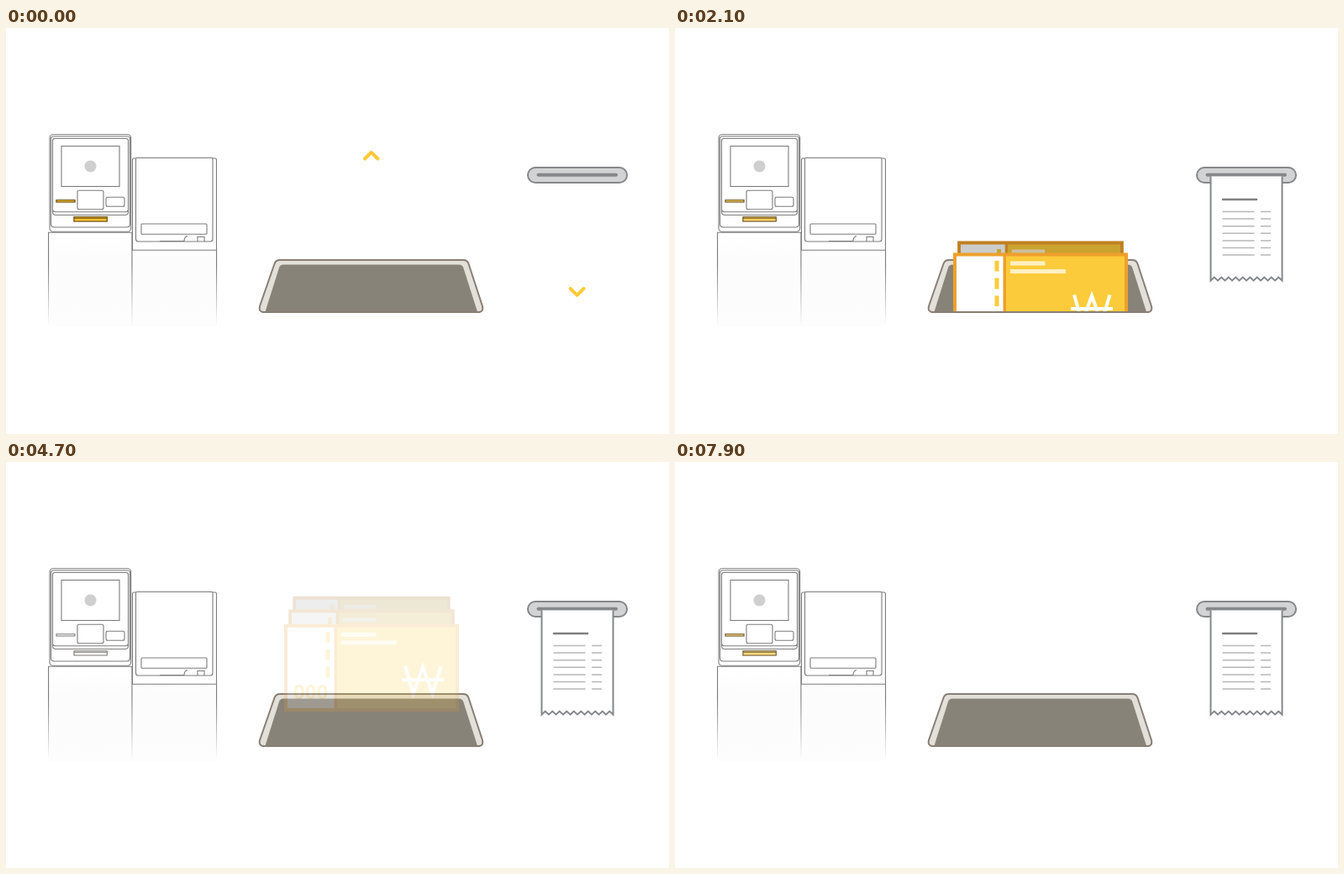
Recreate the animation shown at these times as an HTML page. Size 789 by 483 pixels, loop 8 s.

```html
<!DOCTYPE html>
<html lang="en">
<head>
<meta charset="utf-8">
<title>Kiosk cash and receipt</title>
<style>
  html, body { margin: 0; width: 100%; height: 100%; overflow: hidden; background: #fff; }
  svg { display: block; width: 789px; height: 483px; }
  .thin { fill: none; stroke: #7c7c7c; stroke-width: 1.1; }
  .grey { stroke: #85878a; stroke-width: 2; }
  .chevron { fill: none; stroke: #ffc938; stroke-width: 4; stroke-linecap: round; stroke-linejoin: round; }
  .zeros { font: 700 24px "Open Sans", sans-serif; fill: #fccb3b; }
</style>
</head>
<body>
<svg viewBox="0 0 789 483">
  <defs>
    <linearGradient id="fadeLine" gradientUnits="userSpaceOnUse" x1="0" y1="243" x2="0" y2="354">
      <stop offset=".35" stop-color="#7c7c7c"/><stop offset="1" stop-color="#7c7c7c" stop-opacity="0"/>
    </linearGradient>
    <linearGradient id="fadeFill" gradientUnits="userSpaceOnUse" x1="0" y1="243" x2="0" y2="356">
      <stop offset="0" stop-color="#fff"/><stop offset=".3" stop-color="#fcfcfc"/><stop offset="1" stop-color="#fdfdfd"/>
    </linearGradient>
    <clipPath id="trayClip"><path d="M0 0H789V337H0z"/></clipPath>
    <clipPath id="slotClip"><path d="M600 176.5H789V483H600z"/></clipPath>
    <g id="bill">
      <rect x="331" width="208" height="104" fill="#eea02b"/>
      <rect x="335" y="4" width="55.5" height="96" fill="#fff"/>
      <rect x="394" y="4" width="141" height="96" fill="#fccb3b"/>
      <path d="M383 9.500v12.500M383 30v13M383 51v12.500" stroke="#fccb3b" stroke-width="5"/>
      <path d="M399 12.500h41.500M399 22h66" stroke="#fff0c4" stroke-width="5"/>
      <path d="M475 50L484.500 83L496 51L507.500 83L517.500 50M471 66.500h50" fill="none" stroke="#fff" stroke-width="4"/>
      <text class="zeros" x="342" y="89">000</text>
    </g>
  </defs>

  <g class="thin">
    <path d="M50.500 243H150V356H50.500zM150 264H250.500V356H150z" fill="url(#fadeFill)" stroke="none"/>
    <g fill="url(#fadeLine)" stroke="none">
      <rect x="50" y="243" width="1.100" height="111"/>
      <rect x="149.400" y="243" width="1.100" height="111"/>
      <rect x="250" y="264" width="1.100" height="90"/>
    </g>
    <path d="M50 243.300H150M150 264.300H251M150.500 264V157q0-2 2-2H248.500q2 0 2 2V264"/>
    <path d="M154.500 156q0-1.500 1.500-1.500H244.500q1.500 0 1.500 1.500V251q0 3-3 3H157.500q-3 0-3-3z" fill="#fff"/>
    <rect x="161" y="233" width="78" height="12.300" rx="1"/>
    <path d="M183 253.500h29q0-5 4-6M228 254v-5.500h8v5.500"/>
    <rect x="52" y="126.700" width="96.700" height="115.500" rx="4"/>
    <path d="M53.500 131q0-2 3-2H144.500q3 0 3 2V233q0 4-4 4H57.500q-4 0-4-4z"/>
    <path d="M55.500 134q0-2.500 2.500-2.500H143q2.500 0 2.500 2.500V219q0 3.500-4 3.500H59.500q-4 0-4-3.500zM55.500 216q0 2.700 3 2.700H142.500q3 0 3-2.700"/>
    <rect x="66" y="140.500" width="69" height="48"/>
    <rect x="85" y="193.200" width="31" height="22.500" rx="2"/>
    <rect x="119" y="201.200" width="22" height="11" rx="2"/>
    <path id="slots" d="M60 204.700h22v2.300h-22zM81 224.800h39.300v5.200h-39.300zM81 226.300h39.300"/>
    <path id="glow" d="M60 204.700h22v2.300h-22zM81 224.800h39.300v5.200h-39.300zM81 226.300h39.300" fill="#ffc22e" stroke="#6e5212"/>
  </g>
  <circle cx="100.500" cy="164.500" r="7" fill="#cfcfcf"/>

  <path id="tray" d="M326 276H544q5 0 6.500 4.500L567 331q1.500 7-5 7H307q-6.500 0-5-7L319.500 280.500q1.500-4.500 6.500-4.500z" fill="#e3e0da" stroke="#887f74" stroke-width="2"/>
  <path d="M330 281.500H539q4 0 5.300 3.700L561 337.500H308.500L325 285.200q1.200-3.700 5-3.700z" fill="#888378"/>
  <g clip-path="url(#trayClip)"><g id="bills"></g></g>
  <path d="M305 338H564" stroke="#887f74" stroke-width="2"/>

  <rect class="grey" x="621" y="166" width="118" height="18" rx="9" fill="#d1d3d4"/>
  <path d="M633.500 174.700H726" class="grey" style="stroke-width:4" stroke-linecap="round"/>
  <g clip-path="url(#slotClip)"><g id="receipt"></g></g>
  <g id="arrows"></g>
</svg>
<script>
const LOOP = 8000, STEP = 100;
const ARROW_CYCLE = 3000, RECEIPT_CYCLE = 5000, GLOW_CYCLE = 1888;
const $ = id => document.getElementById(id);
const clamp = x => Math.min(1, Math.max(0, x));
const easeOut = x => 1 - (1 - clamp(x)) ** 2;
const smooth = x => (x = clamp(x), x * x * (3 - 2 * x));
const move = (el, y) => el.setAttribute('transform', `translate(0 ${y})`);

// Back to front: resting top, scale, shade and start time.
const bills = [
  { top: 234.5, scale: .9, shade: .35, start: 2300 },
  { top: 250, scale: .95, shade: .2, start: 1300 },
  { top: 267.5, scale: 1, shade: 0, start: 300 }
];
$('bills').innerHTML = bills.map(({ scale, shade }) =>
  `<g><g transform="translate(${434.7 * (1 - scale)} 0) scale(${scale} 1)">
    <use href="#bill"/><rect x="331" width="208" height="104" opacity="${shade}"/></g></g>`).join('');

const teeth = 'l4.25 -4l4.25 4'.repeat(10);
const rows = Array.from({ length: 7 }, (_, i) => `M651.500 ${218.5 + 8.6 * i}h38m7.500 0h12`).join('');
$('receipt').innerHTML =
  `<path class="grey" fill="#fff" d="M637.500 150V300.500${teeth}V150"/>
   <path d="M652 204h40" stroke="#808080" stroke-width="2.500" stroke-linecap="round"/>
   <path d="${rows}" stroke="#b8b8b8" stroke-width="1.500"/>`;

// Each trailing chevron starts later and travels less.
const arrows = [
  { travel: 27.5, delay: 0 },
  { travel: 16.5, delay: 100 },
  { travel: 6, delay: 250 }
];
$('arrows').innerHTML = arrows.map(() =>
  `<g><path class="chevron" d="M427 155.500l7.700 -7.500l7.700 7.500"/>
      <path class="chevron" d="M671.700 310l7.900 7.800l7.900 -7.800"/></g>`).join('');

function draw(t) {
  const glow = Math.abs(1 - 2 * (t / GLOW_CYCLE % 1));
  $('glow').setAttribute('opacity', glow);

  const leave = smooth((t - 4180) / 720);
  $('bills').setAttribute('opacity', 1 - leave);
  move($('bills'), -92 * leave);
  bills.forEach(({ top, start }, i) =>
    move($('bills').children[i], 338 + (top - 338) * easeOut((t - start) / 1000)));

  move($('receipt'), -126 * (1 - easeOut(t % RECEIPT_CYCLE / 1800)));

  const phase = t % ARROW_CYCLE;
  arrows.forEach(({ travel, delay }, i) => {
    const pair = $('arrows').children[i], age = phase - delay;
    const shift = age < 0 ? 0 : travel * (1 - Math.exp(-age / 200));
    pair.setAttribute('opacity', age < 0 ? 0 : clamp(1 - phase / 1500 - .06 * i));
    move(pair.children[0], -shift);
    move(pair.children[1], shift);
  });
}

const begin = performance.now();
function tick() {
  const t = (performance.now() - begin) % LOOP;
  draw(Math.floor(t / STEP) * STEP);
  requestAnimationFrame(tick);
}
tick();
</script>
</body>
</html>
```
